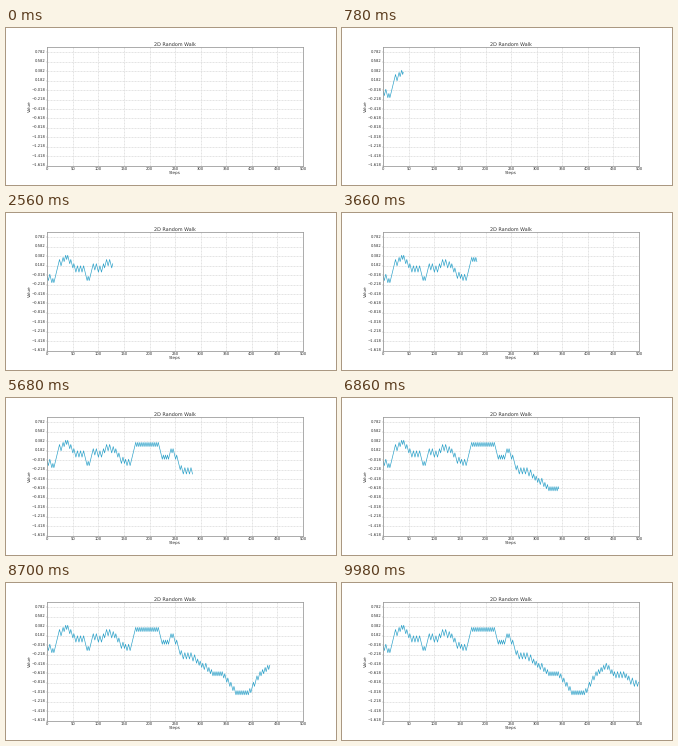
Animation of 330x157 px, one loop 10000 ms. Source, as a matplotlib script:

```python
import numpy as np
import matplotlib.pyplot as plt
from matplotlib.animation import FuncAnimation

W, H, DPI = 330, 157, 100
STEPS = 500
UNIT = 1 / np.sqrt(STEPS)  # size of one step
PX = 72 / DPI              # one pixel in points
INK, FRAME, GRID, LINE = "#333333", "#999999", "#dedede", "#2aa0c8"

# Rough course of the walk: step index, height in units
COURSE = [
    (0, -1), (11, -3), (22, 5), (38, 8), (57, 2), (69, 3), (76, -2),
    (83, -2), (90, 4), (105, 2), (115, 6), (134, 4), (143, 0), (160, -2),
    (172, 7), (215, 7), (224, 1), (236, 1), (244, 5), (262, -5), (283, -6),
    (325, -14), (342, -14), (371, -23), (394, -23), (416, -14), (436, -10),
    (450, -14), (475, -15), (490, -19), (499, -18),
]


def make_walk():
    """Unit steps that turn back once they are a full step past the course."""
    guide = np.interp(np.arange(STEPS), *zip(*COURSE))
    walk, way = [-1], -1
    for goal in guide[:-1]:
        if (walk[-1] - goal) * way >= 1:
            way = -way
        walk.append(walk[-1] + way)
    return np.array(walk) * UNIT


def label(x, y, text, size, **kw):
    fig.text(x / W, 1 - y / H, text, fontsize=size * PX, ha="center",
             color=INK, **kw)


plt.rcParams["font.family"] = "DejaVu Sans"
plt.rcParams["text.hinting"] = "none"

walk = make_walk()
low, high = -25 * UNIT - 0.5, 9 * UNIT + 0.5

fig = plt.figure(figsize=(W / DPI, H / DPI), dpi=DPI, facecolor="white")
left, right, top, bottom = 41.25, 297, 18.7, 137.5
ax = fig.add_axes([left / W, 1 - bottom / H,
                   (right - left) / W, (bottom - top) / H])
ax.set_xlim(0, STEPS)
ax.set_ylim(low, high)
ax.set_axisbelow(True)

y_ticks = np.arange(low, high, 0.2)
ax.set_xticks(range(0, STEPS + 1, 50))
ax.set_yticks(y_ticks, [f"{v:.3f}".replace("-", "\u2212") for v in y_ticks])
ax.tick_params(labelsize=3.75 * PX, length=1.2 * PX, width=0.4 * PX,
               pad=0.8 * PX, color=FRAME, labelcolor=INK)
ax.grid(color=GRID, linewidth=0.8 * PX, linestyle=(0, (2.5, 1.25)))
for spine in ax.spines.values():
    spine.set(linewidth=0.8 * PX, color=FRAME)

label(169, 17.5, "2D Random Walk", 4.9)
label(169, 144.7, "Steps", 4.2, va="center")
label(24, 78, "Value", 4.2, va="center", rotation=90)

line, = ax.plot([], [], color=LINE, linewidth=0.65 * PX)


def update(k):
    line.set_data(np.arange(k + 1), walk[:k + 1])
    return line,


anim = FuncAnimation(fig, update, frames=STEPS, interval=20,
                     repeat=True, repeat_delay=0, blit=True)
plt.show()
```
